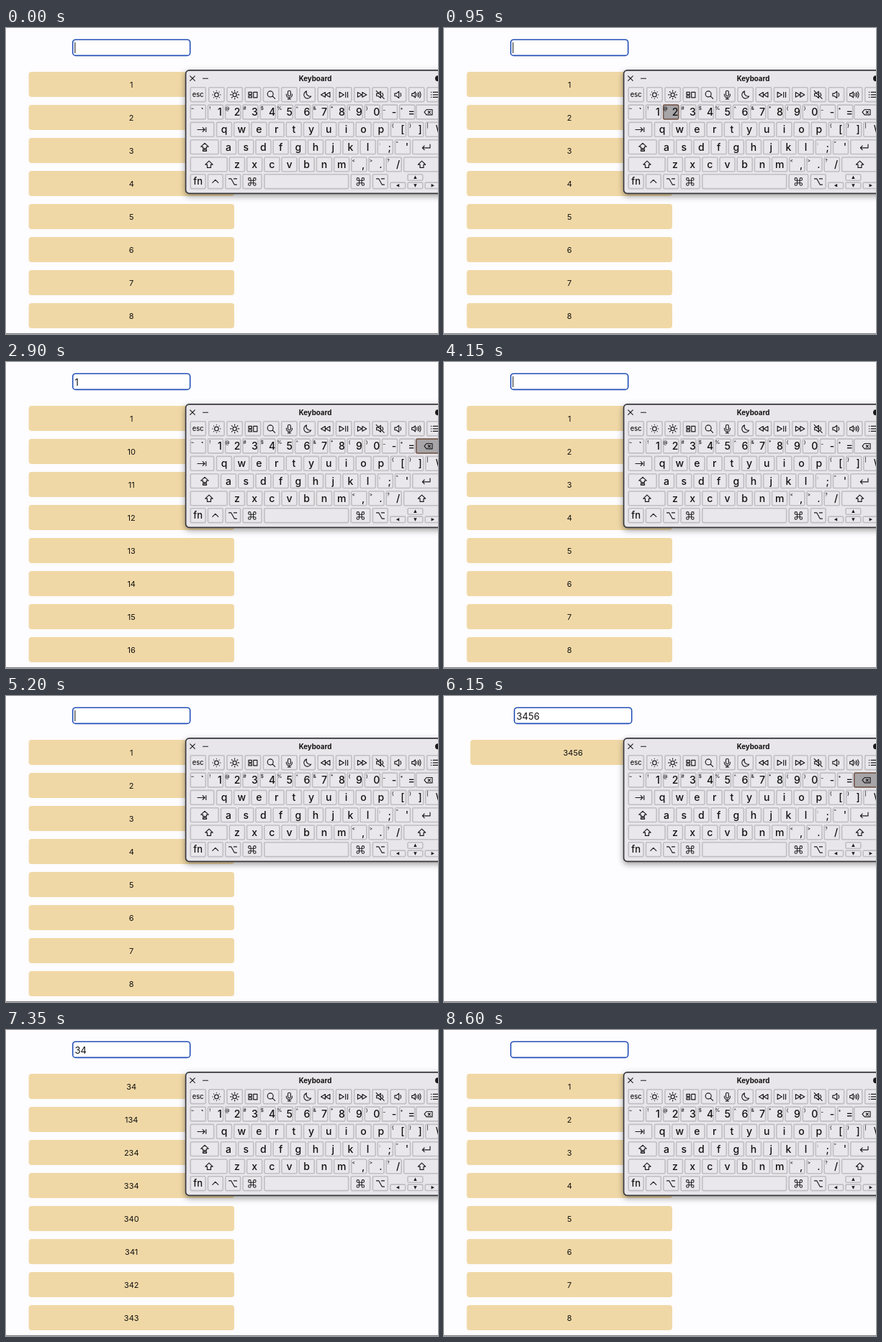
Recreate the animation shown at these times as an HTML page. Size 600 by 426 pixels, loop 8.65 s.

```html
<!DOCTYPE html>
<html lang="en">
<head>
<meta charset="utf-8">
<style>
  html, body { margin: 0; width: 100%; height: 100%; overflow: hidden; background: #fdfcfe; }
  svg { display: block; width: 600px; height: 426px; font-family: Inter, Roboto, sans-serif; }
  .item { fill: #f0d8a6; }
  .key { fill: #e9e7eb; stroke: #bfbec2; stroke-width: 1.6; }
  .key.pressed { fill: #a7a5a8; stroke: #75594d; }
  .icon { fill: none; stroke: #1a1a1c; stroke-width: 1.15; stroke-linecap: round; stroke-linejoin: round; }
  .solid { fill: #1a1a1c; stroke: none; }
  .cap { font-size: 14px; font-weight: 500; }
  .alt { font-size: 6.5px; font-weight: 500; }
  .title { font-size: 9.7px; font-weight: 700; }
  .num { font-size: 11px; }
  text { fill: #111; white-space: pre; }
</style>
</head>
<body>
<svg viewBox="0 0 600 426">
  <defs>
    <filter id="shadow" x="-10%" y="-10%" width="120%" height="130%">
      <feDropShadow dx="0" dy="3" stdDeviation="4.5" flood-color="#000" flood-opacity=".38"/>
    </filter>
  </defs>
  <g id="page">
    <rect x="92.7" y="16.2" width="163" height="22.2" rx="4" fill="#fff" stroke="#2450b8" stroke-width="1.6"/>
    <text id="query" x="95.6" y="32.6" font-size="13"/>
    <path id="caret" d="M95.9 20v15" stroke="#111"/>
  </g>
  <g id="keyboard">
    <rect x="249.6" y="58.8" width="380" height="171.6" rx="5" fill="#e8e6ea" stroke="#38383c" stroke-width="1.7" filter="url(#shadow)"/>
    <text class="title" x="429.5" y="73.8" text-anchor="middle">Keyboard</text>
    <path class="icon" d="M255.7 66.8l6.6 6.6m0-6.6l-6.6 6.6M273.5 70.2h7"/>
    <circle class="solid" cx="600" cy="70.2" r="4"/>
  </g>
  <path d="M0 425.5H600" stroke="#77767a"/>
</svg>
<script>
const $ = id => document.getElementById(id);
const page = $('page'), board = $('keyboard'), keys = {};

function add(parent, tag, attrs, text = '') {
  const el = document.createElementNS('http://www.w3.org/2000/svg', tag);
  for (const name in attrs) el.setAttribute(name, attrs[name]);
  el.textContent = text;
  parent.append(el);
  return el;
}
function key(x, y, w, h = 21.4) {
  return add(board, 'rect', { class: 'key', x: x + .8, y: y + .8, width: w - 1.6, height: h - 1.6, rx: 1.5 });
}
function label(x, y, text, cls = 'cap', anchor = 'middle') {
  return add(board, 'text', { class: cls, x, y, 'text-anchor': anchor }, text);
}
function icon(x, y, d, cls = 'icon', scale = 1) {
  add(board, 'path', { class: cls, d, transform: `translate(${x} ${y}) scale(${scale})` });
}

// Rows of single-width keys; a two-character entry is shifted symbol + base symbol.
const PITCH = 24.2;
function row(x0, y, entries) {
  entries.split(' ').forEach((entry, i) => {
    const x = x0 + i * PITCH, base = entry.at(-1);
    keys[base] = key(x, y, 22.6);
    if (entry.length > 1) {
      label(x + 3.6, y + 7.6, entry[0], 'alt');
      label(x + 17.2, y + 15.6, base);
    } else label(x + 11.3, y + 15.6, base);
  });
}
row(255.5, 106.3, '~` !1 @2 #3 $4 %5 ^6 &7 *8 (9 )0 _- +=');
row(291.7, 130.6, 'q w e r t y u i o p {[ }] |\\');
row(297.7, 154.9, 'a s d f g h j k l :; "\'');
row(309.6, 179.2, 'z x c v b n m <, >. ?/');

const shift = 'M0-5 5.2 0H2.5V4.3h-5V0H-5.2z';
const option = 'M-5.5-4h3.3l4.4 8.2h3.3M1.4-4h4.1';
const command = 'M-2-2h4v4h-4zM-2-2v-2a2 2 0 1 0-2 2zM2-2h2a2 2 0 1 0-2-2zM2 2v2a2 2 0 1 0 2-2zM-2 2h-2a2 2 0 1 0 2 2z';
const wide = [
  // x, y, width, icon centre, icon, scale
  [569, 106.3, 40, 586.5, 'M-5.5 0-2.4-3.7H5.5V3.7H-2.4zM-.3-1.6 2.9 1.6M2.9-1.6-.3 1.6'],
  [255.5, 130.6, 34, 272, 'M-6 0H4M1.2-2.8 4 0 1.2 2.8M5.8-3V3'],
  [255.5, 154.9, 40.4, 276, 'M0-5.5 5.2-.6H2.5V1.8h-5V-.6H-5.2zM-2.5 3.5h5v2h-5z'],
  [564, 154.9, 45, 583.5, 'M5.5-3.8V1H-5.2M-2.4-1.8-5.2 1-2.4 3.8'],
  [255.5, 179.2, 52.4, 282, shift],
  [551.8, 179.2, 60, 577.5, shift],
  [279.7, 203, 22.4, 290.8, 'M-4 1.5 0-2.5 4 1.5'],
  [304, 203, 22.4, 315, option],
  [328.2, 203, 27.6, 341.8, command, .88],
  [478.4, 203, 28, 492.3, command, .88],
  [508.6, 203, 22.4, 520, option]
].map(([x, y, w, cx, d, scale]) => {
  const el = key(x, y, w);
  icon(cx, y + 10.9, d, 'icon', scale);
  return el;
});
keys['<'] = wide[0];

key(255.5, 203, 22.4);
label(266.7, 217.8, 'fn').style.fontSize = '13px';
key(358, 203, 118.4);
[[533, 214.3, 180], [557.2, 214.3, 90], [557.2, 203, -90], [581.4, 214.3, 0]].forEach(([x, y, turn]) => {
  key(x, y, 22.4, 10);
  add(board, 'path', { class: 'solid', d: 'M-2-2.2 2.4 0-2 2.2z', transform: `translate(${x + 11.2} ${y + 5}) rotate(${turn})` });
});

// Function row
const disc = r => `M${-r} 0a${r} ${r} 0 1 0 ${2 * r} 0a${r} ${r} 0 1 0 ${-2 * r} 0z`;
function sun(r, inner, outer) {
  let d = disc(r);
  for (let i = 0; i < 8; i++) {
    const c = Math.cos(i * Math.PI / 4), s = Math.sin(i * Math.PI / 4);
    d += `M${c * inner} ${s * inner}L${c * outer} ${s * outer}`;
  }
  return d;
}
const speaker = 'M-5-1.8h2.4L.8-4.6V4.6L-2.6 1.8H-5z';
const functions = [
  sun(2.8, 5.3, 5.5),
  sun(2.6, 4.6, 6),
  'M-6-3.5h4.5v3H-6zM-6 1.2h4.5v2.8H-6zM.8-3.5H6v7.5H.8z',
  'M3-1a4 4 0 1 0-8 0a4 4 0 1 0 8 0zM2 2 5.5 5.5',
  'M-1.9-3.8a1.9 1.9 0 0 1 3.8 0V0a1.9 1.9 0 0 1-3.8 0zM-4-.8V0a4 4 0 0 0 8 0v-.8M0 4v2M-2 6h4',
  'M-1.2-5A5.2 5.2 0 1 0 5 2.2 5.4 5.4 0 0 1-1.2-5z',
  'M-.5-3.4V3.4L-6.4 0zM6-3.4V3.4L.2 0z',
  'M-6-3.6V3.6L.2 0zM2.6-3.6v7.2M5.4-3.6v7.2',
  'M.5-3.4V3.4L6.4 0zM-6-3.4V3.4L-.2 0z',
  speaker + 'M-5.5-5.5 5.5 5.5M3-2.5Q4.6 0 3.6 1.8',
  speaker + 'M3-2.4Q4.6 0 3 2.4',
  'M-6.5-1.6h2L-1.7-4V4l-2.8-2.4h-2zM.3-1.8Q1.5 0 .3 1.8M2.4-3Q4.3 0 2.4 3M4.5-4.2Q7.2 0 4.5 4.2',
  'M-5-3.5h.3M-5 0h.3M-5 3.5h.3M-2.2-3.5H6M-2.2 0H6M-2.2 3.5H6'
];
key(255.5, 82, 22.6);
label(266.7, 95.8, 'esc').style.fontSize = '9.3px';
functions.forEach((d, i) => {
  const x = 292.4 + i * 25.25;
  key(x - 11.5, 82, 23);
  icon(x, 92.9, d);
});

// Result list
const items = Array.from({ length: 8 }, (_, i) => {
  const group = add(page, 'g', { transform: `translate(0 ${46 * i})` });
  add(group, 'rect', { class: 'item', x: 31.6, y: 61, width: 285.4, height: 35, rx: 4 });
  const text = add(group, 'text', { class: 'num', x: 174.2, y: 82.9, 'text-anchor': 'middle' });
  return { group, text };
});
let shown = null;
function search(query) {
  if (query === shown) return;
  shown = query;
  const hits = [];
  for (let n = 1; n < 10000 && hits.length < 8; n++) if (String(n).includes(query)) hits.push(n);
  items.forEach(({ group, text }, i) => {
    group.style.display = i < hits.length ? '' : 'none';
    text.textContent = hits[i] ?? '';
  });
  // A short list needs no scrollbar, so the page re-centres.
  page.setAttribute('transform', `translate(${hits.length < 8 ? 5 : 0} 0)`);
  $('query').textContent = query;
}

const LOOP = 8650;
const presses = [
  ['1', 500, 700], ['2', 800, 1000], ['3', 1150, 1350],
  ['<', 2100, 2300], ['<', 2450, 2650], ['<', 2800, 3000],
  ['3', 4200, 4350], ['4', 4400, 4550], ['5', 4600, 4750], ['6', 4950, 5100],
  ['<', 6050, 6250], ['<', 6500, 6700], ['<', 7000, 7200], ['<', 7600, 7850]
];
// The page lags behind the keys while it filters.
const queries = [
  [0, ''], [1350, '123'], [2350, '12'], [2850, '1'], [3500, ''],
  [5350, '3456'], [6850, '345'], [7200, '34'], [7800, '3'], [8300, '']
];
const clamp = v => Math.max(0, Math.min(1, v));

function draw(now) {
  const t = now % LOOP;
  const query = queries.findLast(([start]) => t >= start)[1];
  search(query);
  const fade = t < 400 ? 1 - clamp((t - 50) / 250) : t < 8300 ? clamp((t - 500) / 250) : 0;
  $('caret').style.opacity = query ? 0 : fade;
  for (const name in keys) {
    const down = presses.some(([k, start, end]) => k === name && t >= start && t < end);
    keys[name].classList.toggle('pressed', down);
  }
  requestAnimationFrame(() => draw(performance.now() - begin));
}
const begin = performance.now();
draw(0);
</script>
</body>
</html>
```
